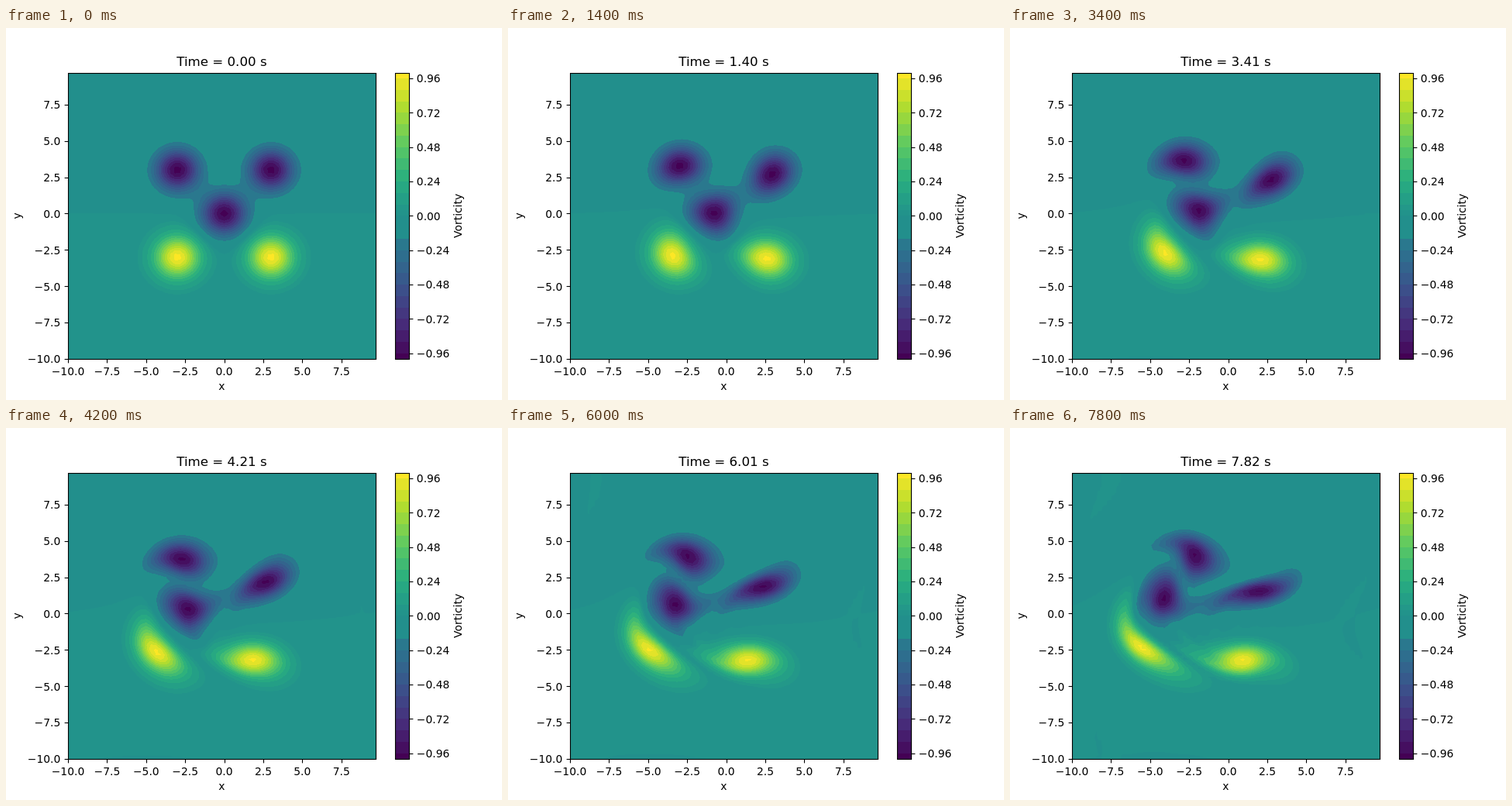
Recreate the animation shown at these times as an HTML page with a canvas. Size 640 by 480 pixels, loop 8000 ms.

```html
<!DOCTYPE html>
<html lang="en">
<head>
<meta charset="utf-8">
<title>Vorticity</title>
<style>
html, body { margin: 0; width: 100%; height: 100%; overflow: hidden; background: #fff; }
canvas { display: block; }
</style>
</head>
<body>
<canvas id="stage" width="640" height="480"></canvas>
<script>
const ctx = document.getElementById('stage').getContext('2d');

// Vorticity equation on a periodic grid
const N = 64, SIZE = N * N, LENGTH = 20, H = LENGTH / N;
const VISCOSITY = 0.001, FRAMES = 40, FRAME_MS = 200;
const FRAME_DT = 100 / 499, SUBSTEPS = 4;

function fft(re, im, start, stride) {
  for (let i = 1, j = 0; i < N; i++) {
    let bit = N >> 1;
    for (; j & bit; bit >>= 1) j ^= bit;
    j ^= bit;
    if (i < j) {
      const a = start + i * stride, b = start + j * stride;
      [re[a], re[b]] = [re[b], re[a]];
      [im[a], im[b]] = [im[b], im[a]];
    }
  }
  for (let len = 2; len <= N; len *= 2) {
    const half = len / 2;
    for (let k = 0; k < half; k++) {
      const angle = -2 * Math.PI * k / len, c = Math.cos(angle), s = Math.sin(angle);
      for (let i = k; i < N; i += len) {
        const a = start + i * stride, b = a + half * stride;
        const x = re[b] * c - im[b] * s, y = re[b] * s + im[b] * c;
        re[b] = re[a] - x; im[b] = im[a] - y;
        re[a] += x; im[a] += y;
      }
    }
  }
}

function fft2(re, im) {
  for (let i = 0; i < N; i++) fft(re, im, i * N, 1);
  for (let i = 0; i < N; i++) fft(re, im, i, N);
}

const waveNumber = i => 2 * Math.PI / LENGTH * (i < N / 2 ? i : i - N);

function streamFunction(w) {
  const re = Float64Array.from(w), im = new Float64Array(SIZE);
  fft2(re, im);
  for (let p = 0; p < SIZE; p++) {
    const k2 = waveNumber(p % N) ** 2 + waveNumber(Math.floor(p / N)) ** 2;
    const scale = k2 ? -1 / (k2 * SIZE) : 0;
    re[p] *= scale;
    im[p] *= scale;
  }
  fft2(im, re); // swapped parts give the inverse transform
  return re;
}

function rate(w) {
  const psi = streamFunction(w), out = new Float64Array(SIZE);
  for (let j = 0; j < N; j++) {
    const row = j * N, up = (j + 1) % N * N, down = (j + N - 1) % N * N;
    for (let i = 0; i < N; i++) {
      const e = row + (i + 1) % N, o = row + (i + N - 1) % N, n = up + i, s = down + i;
      const advection = ((psi[e] - psi[o]) * (w[n] - w[s]) -
        (psi[n] - psi[s]) * (w[e] - w[o])) / (4 * H * H);
      const laplacian = (w[e] + w[o] + w[n] + w[s] - 4 * w[row + i]) / (H * H);
      out[row + i] = VISCOSITY * laplacian - advection;
    }
  }
  return out;
}

function step(w, dt) {
  const plus = (k, f) => w.map((v, p) => v + f * k[p]);
  const a = rate(w), b = rate(plus(a, dt / 2)), c = rate(plus(b, dt / 2)), d = rate(plus(c, dt));
  return w.map((v, p) => v + dt / 6 * (a[p] + 2 * b[p] + 2 * c[p] + d[p]));
}

// x, y, sign of each vortex
const vortices = [[-3, 3, -1], [3, 3, -1], [0, 0, -1], [-3, -3, 1], [3, -3, 1]];

function simulate() {
  let w = new Float64Array(SIZE).map((_, p) => {
    const x = p % N * H - 10, y = Math.floor(p / N) * H - 10;
    return vortices.reduce((sum, [cx, cy, sign]) =>
      sum + sign * Math.exp(-((x - cx) ** 2 + (y - cy) ** 2) / 2), 0);
  });
  const fields = [w];
  while (fields.length < FRAMES) {
    for (let i = 0; i < SUBSTEPS; i++) w = step(w, FRAME_DT / SUBSTEPS);
    fields.push(w);
  }
  return fields;
}

// Colour bands, 0.04 wide, mostly joined in pairs
const STEP = 0.04, BANDS = 50;
const viridis = ['440154', '472d7b', '3b528b', '2c728e', '21918c', '28ae80', '5ec962', 'addc30', 'fde725']
  .map(hex => [0, 2, 4].map(i => parseInt(hex.slice(i, i + 2), 16)));

function colour(value) {
  const pos = Math.min(Math.max((value + 1) * 4, 0), 8), i = Math.min(Math.floor(pos), 7);
  return viridis[i].map((c, ch) => Math.round(c + (viridis[i + 1][ch] - c) * (pos - i)));
}

const bands = Array.from({ length: BANDS }, (_, k) => {
  const n = k - BANDS / 2;
  if (n >= -4 && n < 0) return colour(-STEP / 2);
  if (n === 0 || n === 1) return colour((n + 0.5) * STEP);
  return colour((2 * Math.floor(n / 2) + 1) * STEP);
});

// Layout
const LEFT = 80, TOP = 57.6, WIDTH = 396.8, HEIGHT = 369.6, BOTTOM = TOP + HEIGHT;
const BAR_LEFT = 501.6, BAR_RIGHT = 520.08;
const SPAN = LENGTH - H;
const plotX = x => LEFT + (x + 10) / SPAN * WIDTH;
const plotY = y => BOTTOM - (y + 10) / SPAN * HEIGHT;
const barY = v => BOTTOM - (v + 1) / 2 * HEIGHT;
const snap = v => Math.round(v) + 0.5;

const image = ctx.createImageData(397, 370);
const IMAGE_LEFT = 80, IMAGE_TOP = 58;

function drawField(w) {
  const { width, height, data } = image;
  for (let r = 0, q = 0; r < height; r++) {
    const gy = Math.max((BOTTOM - IMAGE_TOP - r - 0.5) / HEIGHT * (N - 1), 0);
    const j = Math.min(Math.floor(gy), N - 2), fy = gy - j;
    for (let c = 0; c < width; c++, q += 4) {
      const gx = Math.min((c + 0.5) / WIDTH * (N - 1), N - 1);
      const i = Math.min(Math.floor(gx), N - 2), fx = gx - i, p = j * N + i;
      const value = (w[p] * (1 - fx) + w[p + 1] * fx) * (1 - fy) +
        (w[p + N] * (1 - fx) + w[p + N + 1] * fx) * fy;
      const k = Math.min(Math.max(Math.floor(value / STEP) + BANDS / 2, 0), BANDS - 1);
      const [red, green, blue] = bands[k];
      data[q] = red; data[q + 1] = green; data[q + 2] = blue; data[q + 3] = 255;
    }
  }
  ctx.putImageData(image, IMAGE_LEFT, IMAGE_TOP);
}

function line(x1, y1, x2, y2) {
  ctx.beginPath();
  ctx.moveTo(x1, y1);
  ctx.lineTo(x2, y2);
  ctx.stroke();
}

function frameBox(x1, x2) {
  ctx.strokeRect(snap(x1), snap(TOP), Math.round(x2) - Math.round(x1), Math.round(BOTTOM) - Math.round(TOP));
}

function text(string, x, y, align = 'center', size = 13.89) {
  ctx.font = `${size}px "DejaVu Sans", sans-serif`;
  ctx.textAlign = align;
  ctx.fillText(string, x, y);
}

function sideText(string, x, y) {
  ctx.save();
  ctx.translate(x, y);
  ctx.rotate(-Math.PI / 2);
  text(string, 0, 0);
  ctx.restore();
}

const label = (v, digits) => v.toFixed(digits).replace('-', '\u2212');

function drawAxes() {
  const midX = LEFT + WIDTH / 2, midY = TOP + HEIGHT / 2;
  bands.forEach((rgb, k) => {
    const top = Math.round(barY(-1 + (k + 1) * STEP)), bottom = Math.round(barY(-1 + k * STEP));
    ctx.fillStyle = `rgb(${rgb})`;
    ctx.fillRect(502, top, 18, bottom - top);
  });
  ctx.fillStyle = ctx.strokeStyle = '#000';
  ctx.lineWidth = 1.11;
  for (let v = -10; v <= 7.5; v += 2.5) {
    const x = snap(plotX(v)), y = snap(plotY(v));
    line(x, 427.5, x, 432.4);
    line(75.6, y, 80.5, y);
    text(label(v, 1), plotX(v), 447.6);
    text(label(v, 1), 70.3, plotY(v) + 5.2, 'right');
  }
  for (let n = -4; n <= 4; n++) {
    const v = n * 0.24, y = snap(barY(v));
    line(520.5, y, 525.4, y);
    text(label(v, 2), 529.8, barY(v) + 5.2, 'left');
  }
  frameBox(LEFT, LEFT + WIDTH);
  frameBox(BAR_LEFT, BAR_RIGHT);
  text('x', midX, 466.6);
  sideText('y', 18.6, midY);
  sideText('Vorticity', 588, midY);
}

function draw(index) {
  ctx.fillStyle = '#fff';
  ctx.fillRect(0, 0, 640, 480);
  drawField(fields[index]);
  drawAxes();
  text(`Time = ${(index * FRAME_DT).toFixed(2)} s`, LEFT + WIDTH / 2, 49.2, 'center', 16.67);
}

const fields = simulate();
const startTime = performance.now();
let shown = -1;

function tick() {
  const elapsed = performance.now() - startTime;
  const index = Math.floor(elapsed / FRAME_MS) % FRAMES;
  if (index !== shown) draw(shown = index);
  requestAnimationFrame(tick);
}
tick();
</script>
</body>
</html>
```
